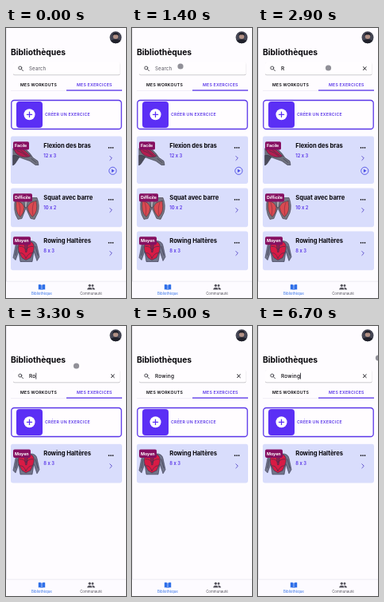
Recreate the animation shown at these times as an HTML page. Size 151 px wide and 338 px high, loop 7 s.

```html
<!DOCTYPE html>
<html lang="fr">
<head>
<meta charset="utf-8">
<title>Bibliothèques</title>
<style>
  html, body { margin: 0; width: 100%; height: 100%; overflow: hidden; background: #fefcff; }
  svg { display: block; width: 100vw; height: 100vh; }
  text { font-family: Inter, "Open Sans", sans-serif; font-weight: 600; fill: #08070c; }
  .title { font-size: 10.3px; font-weight: 700; }
  .name { font-size: 7.6px; font-weight: 700; letter-spacing: -.06px; }
  .sets { font-size: 5.8px; fill: #5935e8; }
  .badge { font-size: 5.3px; font-weight: 700; fill: #fff; }
  .caps { font-size: 5.2px; letter-spacing: .24px; }
  .hint { font-size: 6.2px; font-weight: 400; letter-spacing: .12px; fill: #55535d; }
  .query { font-size: 6.5px; font-weight: 500; letter-spacing: .2px; }
  .nav { font-size: 4.4px; font-weight: 400; text-anchor: middle; }
  .purple { fill: #5935e8; }
  .line { fill: none; stroke-linecap: round; stroke-linejoin: round; }
</style>
</head>
<body>
<svg viewBox="0 0 151 338" preserveAspectRatio="none">
  <defs>
    <filter id="shadow" x="-5%" y="-20%" width="110%" height="150%">
      <feDropShadow dx="0" dy=".7" stdDeviation=".7" flood-color="#55505f" flood-opacity=".5"/>
    </filter>
    <clipPath id="face"><circle cx="138" cy="11.7" r="7.5"/></clipPath>

    <g id="arm" class="line" stroke="#343545" stroke-width=".6">
      <path fill="#70727f" d="M3 15Q10 11 17 15Q24 20 28 27L34 31L35 36L31 36L24 31Q15 28 10 26Q5 31 3 36Z"/>
      <path fill="#b21d50" d="M4 17Q11 13 18 18L25 25Q17 28 10 24Q6 22 4 17Z"/>
      <path fill="#4b4c5b" d="M3 24Q7 23 11 26L5 35L3 36Z"/>
      <path d="M8 18Q15 20 20 25M12 17L22 25M26 28L32 33"/>
    </g>

    <g id="legs" class="line" stroke="#3b3542" stroke-width=".6">
      <path fill="#777783" d="M6 12L33 12Q37 22 34 31L30 39L25 38L19 25L14 38L9 39Q2 28 6 12Z"/>
      <path fill="#d94a51" d="M7 16Q15 17 17 24Q17 31 12 36Q5 31 7 16Z"/>
      <path fill="#d94a51" d="M32 16Q23 17 21 24Q22 31 27 36Q35 31 32 16Z"/>
      <path stroke="#83283e" d="M10 18Q13 25 11 34M29 18Q26 25 28 34"/>
      <path fill="#a9a8b2" d="M17 13L22 13L20 24L18 24Z"/>
    </g>

    <g id="back" class="line" stroke="#32324b" stroke-width=".6">
      <path fill="#72758a" d="M14 12Q19 8 24 12Q32 12 33 18L36 32L33 37L29 25L27 38L12 38L10 25L6 36L3 33L6 18Q8 12 14 12Z"/>
      <path fill="#d81b45" d="M12 14L19 11L27 14Q31 18 28 26L25 33L19 36L14 33L10 25Q8 18 12 14Z"/>
      <path fill="#8e1f54" d="M17 12L22 12L20 26L19 26Z"/>
      <path d="M11 19Q16 18 19 23Q23 18 28 19M12 27Q17 27 19 34Q22 27 27 27M8 19L6 30M31 19L34 30"/>
    </g>
  </defs>

  <rect width="151" height="338" fill="#fefcff"/>
  <rect width=".7" height="338" fill="#dedce4"/>

  <g clip-path="url(#face)">
    <rect x="130" y="4" width="16" height="16" fill="#454654"/>
    <circle cx="138" cy="10.5" r="3.2" fill="#b39286"/>
    <path d="M134.3 10Q134 5.5 138 5.8Q142 5.5 141.7 10L140 8.5L136 8.5Z" fill="#20212b"/>
    <path d="M130 20Q131 14 138 14Q145 14 146 20Z" fill="#20212b"/>
  </g>

  <g id="page">
    <text class="title" x="6" y="34">Bibliothèques</text>
    <rect x="9" y="43" width="134.5" height="15.3" rx="1.8" fill="#fffdff" filter="url(#shadow)"/>
    <g class="line" stroke="#3e3d45" stroke-width=".9">
      <circle cx="17.8" cy="50" r="2"/><path d="M19.4 51.6L21.5 53.7"/>
    </g>
    <text id="hint" class="hint" x="29" y="53">Search</text>
    <text id="query" class="query" x="29" y="53"></text>
    <rect id="caret" y="46.7" width=".8" height="7.8" fill="#25232d"/>
    <path id="clear" class="line" stroke="#17161c" stroke-width="1" d="M132.4 48.7l3.8 3.8m0-3.8l-3.8 3.8"/>

    <text class="caps" x="18" y="72.5">MES WORKOUTS</text>
    <text class="caps purple" x="89" y="72.5">MES EXERCICES</text>
    <rect x="6" y="78.2" width="140" height=".5" fill="#e5e1ee"/>
    <rect x="76" y="77.4" width="70" height="1.3" fill="#5935e8"/>

    <rect x="6.8" y="90.5" width="138.4" height="36" rx="3.6" fill="#fffdff" stroke="#5935e8" stroke-width="1.3"/>
    <rect x="13" y="92" width="33" height="33" rx="4" fill="#5b2ff5"/>
    <circle cx="29.5" cy="108.3" r="7" fill="#fff"/>
    <path class="line" stroke="#5b2ff5" stroke-width="1.3" d="M26.4 108.3h6.2m-3.1-3.1v6.2"/>
    <text class="caps purple" x="49" y="110.2">CRÉER UN EXERCICE</text>
  </g>

  <g id="cards"></g>

  <rect y="317" width="151" height="21" fill="#fdfbff"/>
  <rect y="316.8" width="151" height=".6" fill="#e2dfe8"/>
  <path fill="#2f6fe8" d="M40.8 321.2Q43.3 320.6 44.7 321.8V328Q43 327 40.8 327.4ZM49.2 321.2Q46.7 320.6 45.3 321.8V328Q47 327 49.2 327.4Z"/>
  <text class="nav" x="45" y="333.5" style="fill:#2f6fe8">Bibliothèque</text>
  <g fill="#55545d">
    <circle cx="105.3" cy="322.3" r="1.6"/><circle cx="109" cy="322.5" r="1.4"/>
    <path d="M102.2 327.5Q102.4 324.7 105.3 324.7Q108.2 324.7 108.4 327.5ZM109 327.5Q109 325.8 108 324.8Q111.6 324.5 112 327.5Z"/>
  </g>
  <text class="nav" x="107" y="333.5" style="fill:#55545d">Communauté</text>

  <circle id="pointer" r="3.6" fill="#85848d"/>
</svg>

<script>
const LOOP = 7000;
const FILTERED = 3300;
const SHIFT = 12;
const $ = id => document.getElementById(id);

const exercises = [
  { top: 135.5, height: 59.5, name: "Flexion des bras", sets: "12 x 3", level: "Facile", badge: 20, art: "arm", play: true },
  { top: 200.5, height: 48.7, name: "Squat avec barre", sets: "10 x 2", level: "Difficile", badge: 24, art: "legs" },
  { top: 254.5, height: 48.7, name: "Rowing Haltères", sets: "8 x 3", level: "Moyen", badge: 22, art: "back" }
];

const playIcon = `
  <circle cx="134.3" cy="43.3" r="4.6" fill="none" stroke="#4f50e6" stroke-width=".9"/>
  <path d="M132.9 41.1L136.6 43.3L132.9 45.5Z" fill="#4f50e6"/>`;

const card = e => `
  <g transform="translate(0 ${e.top})">
    <rect x="6" width="140" height="${e.height}" rx="2.4" fill="#d9ddfc"/>
    <use href="#${e.art}" x="6"/>
    <rect x="9" y="6.7" width="${e.badge}" height="10.4" rx="1.8" fill="#861061"/>
    <text class="badge" x="11" y="13.8">${e.level}</text>
    <text class="name" x="47.3" y="14.6">${e.name}</text>
    <text class="sets" x="47.3" y="26.4">${e.sets}</text>
    ${[129.5, 132, 134.5].map(x => `<circle cx="${x}" cy="14.3" r=".85"/>`).join("")}
    <path class="line" stroke="#5546c8" stroke-width=".9" d="M130.8 25l2.5 2.5l-2.5 2.5"/>
    ${e.play ? playIcon : ""}
  </g>`;

$("cards").innerHTML = exercises.map(card).join("");
const cards = [...$("cards").children];

// [start, typed text, caret shown]
const typing = [
  [0, "", 0], [1700, "", 1], [2100, "", 0],
  [2400, "R", 1], [2900, "R", 0], [3300, "Ro", 1],
  [3600, "Row", 1], [3800, "Rowi", 1], [4100, "Rowin", 1],
  [4400, "Rowing", 1], [5000, "Rowing", 0], [5500, "Rowing", 1],
  [5900, "Rowing", 0], [6500, "Rowing", 1]
];

// [time, x, y, opacity]
const path = [
  [900, 59, 78, 0], [1000, 59, 68, .9], [1200, 60, 49, .9], [1400, 61, 48, .9],
  [1600, 76, 49.5, .9], [1900, 88.5, 50, .9], [3800, 88.5, 50, .9],
  [3900, 88.5, 50, 0], [6400, 156, 38, 0], [6500, 155, 38.5, .9],
  [6700, 151.5, 40, .9], [7000, 151.5, 40, .9]
];

function pointerAt(t) {
  if (t < path[0][0]) return [0, 0, 0];
  const i = path.findIndex(p => p[0] > t);
  const a = path[i - 1], b = path[i];
  const k = (t - a[0]) / (b[0] - a[0]);
  return [1, 2, 3].map(n => a[n] + (b[n] - a[n]) * k);
}

function show(el, on) {
  el.setAttribute("visibility", on ? "visible" : "hidden");
}

function draw(t) {
  const [, text, caret] = typing.findLast(s => s[0] <= t);
  const filtered = t >= FILTERED;

  $("query").textContent = text;
  show($("hint"), !text);
  show($("clear"), text);
  show($("caret"), caret);
  $("caret").setAttribute("x", 29 + (text ? $("query").getComputedTextLength() : -.4));

  $("page").setAttribute("transform", `translate(0 ${filtered ? SHIFT : 0})`);
  cards.forEach((el, i) => show(el, !filtered || i === 2));
  cards[2].setAttribute("transform", `translate(0 ${filtered ? 147.8 : exercises[2].top})`);

  const [x, y, opacity] = pointerAt(Math.floor(t / 100) * 100);
  $("pointer").setAttribute("cx", x);
  $("pointer").setAttribute("cy", y);
  $("pointer").setAttribute("opacity", opacity);
}

const start = performance.now();
function tick() {
  draw((performance.now() - start) % LOOP);
  requestAnimationFrame(tick);
}
tick();
</script>
</body>
</html>
```
